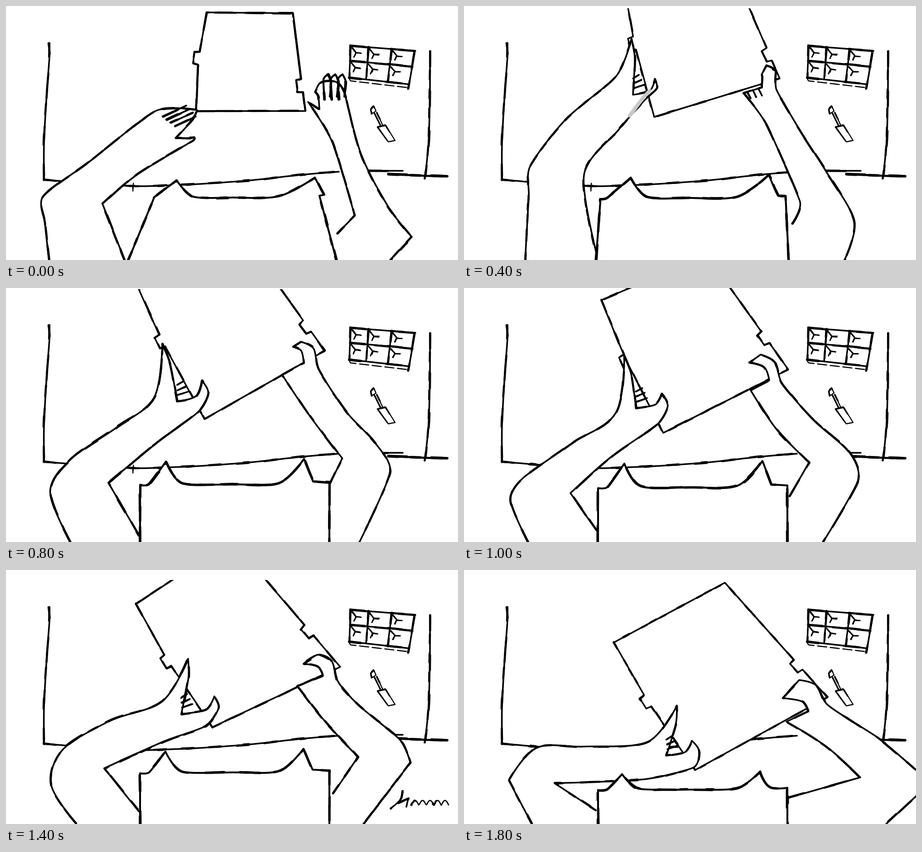
Recreate the animation shown at these times as an HTML page. Size 998 by 561 pixels, loop 2000 ms.

```html
<!DOCTYPE html>
<html lang="en">
<head>
<meta charset="utf-8">
<title>Workbench sketch</title>
<style>
html, body { margin: 0; width: 100%; height: 100%; overflow: hidden; background: #fff; }
svg { display: block; width: 100vw; height: 100vh; fill: none; stroke: #000; stroke-linecap: round; stroke-linejoin: round; }
</style>
</head>
<body>
<svg viewBox="0 0 998 561"><g id="room"></g><g id="live"></g></svg>
<script>
// Key points of each pose.
// box: top left, top right, bottom right, bottom left; top: where its lines start
// left: bottom, elbow x2, forearm, finger base, finger tip, web, thumb tip, thumb base, inner arm x2, sleeve
// right: sleeve, inner elbow, inner arm, inner wrist, palm, hook tip, crown, wrist, forearm, elbow x2, bottom
// head: shift, shoulder height, ear height, flare
const poses = [{
  box: "443,14 634,16 661,232 420,232", top: 0,
  left: "95,561 86,480 82,420 180,347 330,232 422,230 375,292 415,290 412,298 290,372 213,437 262,561",
  right: "732,502 770,463 720,300 667,212 692,228 683,190 696,168 748,195 785,330 845,445 896,510 848,561",
  head: [25, 425, 40, 55]
}, {
  box: "352,-53 609,-44 697,160 420,245", top: 5,
  left: "135,561 143,420 146,354 225,250 336,155 370,72 373,196 422,162 395,212 340,275 265,373 295,557",
  right: "725,480 742,433 668,262 617,192 658,180 658,150 668,132 690,185 745,280 798,363 862,475 840,561",
  head: [16, 426, 47, 10]
}, {
  box: "258,-78 581,-56 692,97 436,259", top: 5,
  left: "143,561 92,430 157,335 250,273 319,208 336,97 376,236 428,175 422,246 340,312 217,407 295,558",
  right: "708,412 723,367 655,258 586,157 641,126 640,95 650,91 679,150 733,257 780,322 826,390 768,561",
  head: [0, 429, 50, 0]
}, {
  box: "303,27 536,-73 716,180 440,320", top: 0,
  left: "141,561 103,470 130,420 240,342 335,276 354,150 380,265 437,234 425,303 325,373 235,453 292,535",
  right: "719,460 762,385 690,312 633,226 674,204 630,165 655,147 702,210 770,290 850,362 870,425 793,561",
  head: [2, 442, 54, 0]
}, {
  box: "287,75 499,-65 738,214 456,347", top: 22,
  left: "155,560 100,475 125,397 230,333 345,290 402,196 387,318 460,279 440,345 350,378 217,438 293,533",
  right: "723,493 777,413 705,335 643,257 700,233 657,207 690,187 734,248 780,300 870,375 893,425 790,561",
  head: [0, 449, 48, 0]
}, {
  box: "307,112 528,-18 756,244 470,391", top: 0,
  left: "153,561 97,455 170,382 260,352 370,322 442,217 424,340 480,289 464,380 350,400 202,447 294,534",
  right: "718,497 808,455 740,375 677,291 728,260 677,236 715,206 746,253 850,345 920,428 947,475 873,561",
  head: [-3, 465, 45, 0]
}, {
  box: "331,160 576,28 802,281 510,442", top: 0,
  left: "149,559 99,465 160,393 265,390 405,380 470,300 447,410 503,377 507,436 400,462 200,471 290,530",
  right: "713,504 875,458 800,390 712,335 760,312 704,283 740,243 800,295 850,330 920,375 1030,470 932,561",
  head: [-3, 487, 36, 0]
}];

// Pose shown in each step; fractions lie between two poses.
const steps = [0, .75, 1, 2, 2.5, 3, 3.7, 4, 5, 6];
const STEP = 200;

const pairs = s => s.split(" ").map(p => p.split(",").map(Number));
const mix = (a, b, t) => a + (b - a) * t;
const mixPt = (p, q, t) => [mix(p[0], q[0], t), mix(p[1], q[1], t)];
const add = (p, x, y) => [p[0] + x, p[1] + y];
const gap = (p, q) => Math.hypot(q[0] - p[0], q[1] - p[1]);
const range = (n, f) => Array.from({ length: n }, (_, i) => f(i));

let seed = 1;
const rnd = () => (seed = seed * 16807 % 2147483647) / 2147483647;

// Smooth through gentle bends, keep sharp corners.
function curve(pts) {
  const tan = pts.map((p, i) => {
    const a = pts[i - 1], b = pts[i + 1];
    if (!a || !b) return [0, 0];
    const dot = (p[0] - a[0]) * (b[0] - p[0]) + (p[1] - a[1]) * (b[1] - p[1]);
    const la = gap(a, p), lb = gap(p, b);
    if (dot < .5 * la * lb) return [0, 0];
    const k = Math.min(la, lb) / 3 / (gap(a, b) || 1);
    return [(b[0] - a[0]) * k, (b[1] - a[1]) * k];
  });
  const f = p => p[0].toFixed(1) + " " + p[1].toFixed(1);
  return pts.map((p, i) => i
    ? "C" + [add(pts[i - 1], ...tan[i - 1]), add(p, -tan[i][0], -tan[i][1]), p].map(f).join(",")
    : "M" + f(p)).join("");
}

// A pen line with broken, heavier and slightly shifted repeats on top.
function ink(pts, w = 4, fill = "none") {
  const base = `<path d="${curve(pts)}" fill="${fill}" stroke-width="${w * .9}"/>`;
  return base + range(2, () => {
    const off = pts.map(p => add(p, rnd() * 2 - 1, rnd() * 2 - 1));
    const dash = [12 + rnd() * 30, 20 + rnd() * 45].map(Math.round).join(" ");
    return `<path d="${curve(off)}" stroke-width="${w * 1.15}" stroke-dasharray="${dash}"/>`;
  }).join("");
}

// A straight edge with one notch cut at fraction t.
function edge(a, b, t, bow) {
  const len = gap(a, b), dx = (b[0] - a[0]) / len, dy = (b[1] - a[1]) / len;
  const at = (along, out) => [a[0] + dx * along - dy * out, a[1] + dy * along + dx * out];
  const n = len * t;
  return [a, at(n, bow), at(n + 2, bow + 12), at(n + 28, bow + 12), at(n + 30, bow), b];
}

function box([tl, tr, br, bl], top) {
  const shape = [...edge(tl, bl, .4, 6), ...edge(tr, br, .67, 0).reverse(), tl];
  return ink(shape, 3.8, "#fff") + `<rect width="998" height="${top}" fill="#fff" stroke="none"/>`;
}

// Point halfway round a bend from p to q.
const bend = (p, q, corner) => mixPt(mixPt(p, corner, .5), mixPt(corner, q, .5), .5);

function leftArm(k) {
  const [base, tip, web, thumb, heel] = k.slice(4, 9);
  const side = add(mixPt(tip, web, .35), 6, 0);
  const ball = add(mixPt(thumb, heel, .4), gap(thumb, heel) / 4, 0);
  return ink([...k.slice(0, 4), base, tip, side, web, bend(web, thumb, [thumb[0], web[1]]),
    thumb, ball, ...k.slice(8)], 4, "#fff");
}

function rightArm(k) {
  const [palm, tip, crown, wrist] = k.slice(4, 8);
  const knuckle = add(mixPt(crown, wrist, .45), 10, -12);
  return ink([...k.slice(0, 5), bend(palm, tip, [palm[0], tip[1]]), tip, crown, knuckle,
    ...k.slice(7)], 4, "#fff");
}

// Fingertips held behind the box.
function grip(web) {
  return range(3, i => {
    const p = add(web, i, -36 + 11 * i);
    return ink([p, add(p, 13 + 5 * i, -8)], 3);
  }).join("");
}

function head([dx, y, ear, flare]) {
  return ink([
    [296 - flare / 2, 565], [296 + flare * .55, y], [Math.max(316, 296 + flare * .55), y - 2],
    [352 + dx, y - ear], [388 + dx, y - 4], [500, y - 2], [603, y - 5],
    [657 + dx, y - ear - 6], [677 + dx, y - 8], [714 - flare * .4, y - 6], [714 + flare * .3, 565]
  ], 4.6, "#fff");
}

function hum() {
  const wave = range(42, i => [895 + 2 * i, 520 - 11 * Math.abs(Math.sin(i * .38))]);
  return ink(pairs("876,488 870,508 850,526")) + ink(pairs("866,514 888,505 884,523")) + ink(wave, 3);
}

const restingFingers = () =>
  range(4, i => ink([[346 + 9 * i, 244 + 7 * i], [398 + 7 * i, 220 + 8 * i]], 4)).join("") +
  range(3, i => {
    const x = 703 + 16 * i;
    return ink([[x, 206], [x - 2, 162], [x + 8, 151], [x + 15, 167], [x + 12, 200]], 4.8);
  }).join("");

function view(pos) {
  const i = Math.floor(pos), t = pos - i, a = poses[i], b = poses[t ? i + 1 : i];
  const key = name => {
    const q = pairs(b[name]);
    return pairs(a[name]).map((p, j) => mixPt(p, q[j], t));
  };
  const left = key("left"), right = key("right");
  let out = box(key("box"), mix(a.top, b.top, t)) + leftArm(left) + rightArm(right);
  if (pos < .5) out += restingFingers();
  else out += grip(left[6]);
  if (pos === 1) out += `<path d="M410 187L396 202L366 242" stroke="#c8c8c8" stroke-width="8"/>`;
  if (pos > .5 && pos < 2.5) {
    out += range(3, j => {
      const p = mixPt(right[3], right[4], .2 + .3 * j);
      return ink([p, add(p, 8, 15)], 3);
    }).join("");
  }
  out += head(a.head.map((v, j) => mix(v, b.head[j], t)));
  return pos > 3.5 && pos < 4.5 ? out + hum() : out;
}

function tray() {
  const [tl, tr, br, bl] = pairs("761,88 903,99 890,173 758,158");
  const at = (u, v) => mixPt(mixPt(tl, tr, u), mixPt(bl, br, u), v);
  const cols = [0, .28, .64], rows = [0, .47];
  let out = "";
  for (const v of [...rows, 1]) out += ink([at(0, v), at(.5, v), at(1, v)], 4);
  for (const u of cols) out += ink([at(u, 0), at(u, 1)], 3.8);
  out += ink([at(1, .05), at(1, 1.12)], 4);
  out += `<path d="${curve([at(0, 1), at(.03, 1.1), at(1, 1.1)])}" stroke-width="2.5" stroke-dasharray="20 8"/>`;
  for (const u of cols) for (const v of rows) {
    const p = at(u + .02, v + .06), fork = add(p, 9, 11);
    out += ink([p, fork, add(p, 5, 20)], 2.4) + ink([fork, add(p, 20, 12)], 2.2);
  }
  return out;
}

const room = [
  [4, "95,83 96,112 90,192 84,300 84,384"],
  [4, "936,100 936,190 933,300 925,380"],
  [4, "83,384 125,387 180,392 290,398 362,396 430,393 540,385 650,373 735,366"],
  [4, "800,364 876,364"],
  [5, "845,371 925,375 974,376"],
  [2, "281,392 280,408"],
  [2.6, "808,238 805,228 812,221 817,232 808,238"],
  [2.6, "814,237 827,263"],
  [2.6, "819,236 832,264"],
  [2.6, "821,268 838,263 859,297 844,300 821,268"]
];

document.getElementById("room").innerHTML = room.map(([w, s]) => ink(pairs(s), w)).join("") + tray();
const live = document.getElementById("live");
const views = steps.map(view);
let shown = -1;

function tick(now) {
  const i = Math.floor(now / STEP) % steps.length;
  if (i !== shown) live.innerHTML = views[shown = i];
  requestAnimationFrame(tick);
}
tick(performance.now());
</script>
</body>
</html>
```
